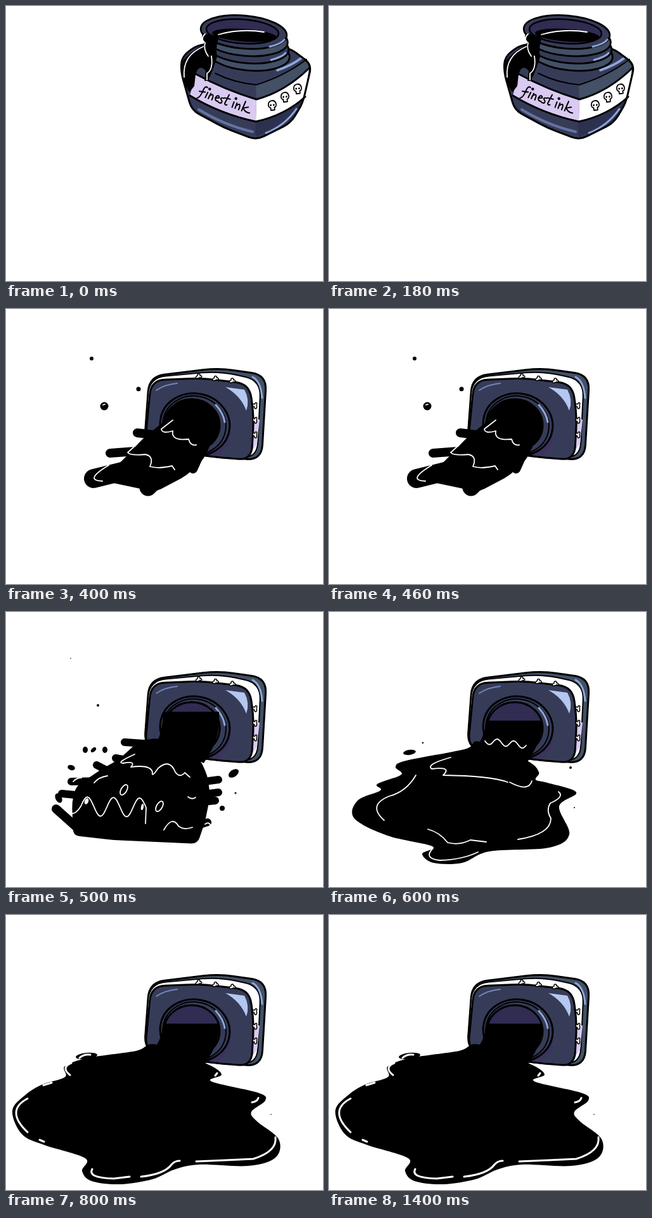
Write an HTML page that moves like this. It is 500 by 433 pixels and loops after 1.8 s.

```html
<!DOCTYPE html>
<html lang="en">
<head>
<meta charset="utf-8">
<title>Spilled ink</title>
<style>
html, body { margin: 0; width: 100%; height: 100%; overflow: hidden; background: #fff; }
svg { display: block; width: 100%; height: 100%; stroke-linecap: round; stroke-linejoin: round; }
.pose { visibility: hidden; animation: 1800ms step-end infinite; }
#full { animation-name: full; }
#tilt { animation-name: tilt; }
#fallen { animation-name: fallen; }
#gush { animation-name: gush; }
#splash { animation-name: splash; }
#pool { animation-name: pool; }
#spread { animation-name: spread; }
#rest { animation-name: rest; }
@keyframes full { 0% { visibility: visible } 16.666% { visibility: hidden } }
@keyframes tilt { 16.666% { visibility: visible } 22.222% { visibility: hidden } }
@keyframes fallen { 22.222% { visibility: visible } }
@keyframes gush { 22.222% { visibility: visible } 27.777% { visibility: hidden } }
@keyframes splash { 27.777% { visibility: visible } 33.333% { visibility: hidden } }
@keyframes pool { 33.333% { visibility: visible } 38.888% { visibility: hidden } }
@keyframes spread { 38.888% { visibility: visible } 44.444% { visibility: hidden } }
@keyframes rest { 44.444% { visibility: visible } }
</style>
</head>
<body>
<svg viewBox="0 0 500 433" preserveAspectRatio="none" role="img" aria-label="A bottle of finest ink tips over">
<defs>
  <g id="skull">
    <path d="M-3 4C-8 3-7-7 0-7S8 3 3 4V8H-3Z" fill="#fff" stroke="#000" stroke-width="1.8"/>
    <circle cx="-2.400" cy="0" r="1.400"/><circle cx="2.400" cy="0" r="1.400"/>
  </g>
  <path id="mark" d="M-4 3C-6 1-3-1-2-1C-3-5 3-5 2-1C5-2 6 2 3 2C1 1 0 4-4 3Z" fill="#fff" stroke="#000" stroke-width="1.5"/>
  <g id="lettering">
    <path fill="none" stroke="#000" stroke-width="2" d="M10-16Q5-18 5-8Q4 4 0 5M0-6L9-8M13-9L12 0M18-9L17 0M17-4Q22-12 23-5V0M27-5L33-7Q31-12 28-8Q26 0 33-1M40-9Q35-9 36-6Q41-3 38 0H34M46-17L44-2Q45 1 48-1M41-10L50-11M57-9V0M62-9V0M62-4Q67-12 68-5V0M74-16L73 0M81-9L74-5Q79 1 86-1"/>
    <circle cx="14" cy="-15" r="2.200"/><circle cx="58" cy="-15" r="2.200"/>
  </g>
</defs>
</svg>
<script>
const NAVY = '#363c58', DEEP = '#2c3150', STEEL = '#435066', GLEAM = '#8fa6da', LILAC = '#d9caf2', PLUM = '#302c52';

const pairs = text => text.match(/\S+ \S+/g).map(p => p.split(' ').map(Number));
const mix = (a, b, t) => a.map((v, k) => v + (b[k] - v) * t);

// Polygon with softened corners.
function soft(text, r) {
  const pts = pairs(text), n = pts.length;
  const cut = (a, b) => mix(a, b, Math.min(.5, r / Math.hypot(b[0] - a[0], b[1] - a[1])));
  return pts.map((p, i) =>
    `${i ? 'L' : 'M'}${cut(p, pts[(i + n - 1) % n])}Q${p} ${cut(p, pts[(i + 1) % n])}`).join('') + 'Z';
}

// Closed smooth curve through key points.
function blob(text) {
  const pts = pairs(text), n = pts.length, at = i => pts[(i + n) % n];
  const lean = (p, a, b) => p.map((v, k) => v + (b[k] - a[k]) / 6);
  return `M${pts[0]}` + pts.map((p, i) =>
    `C${lean(p, at(i - 1), at(i + 1))} ${lean(at(i + 1), at(i + 2), p)} ${at(i + 1)}`).join('') + 'Z';
}

// Sine ripple along a line.
function wave(x0, y0, x1, y1, amp, halves) {
  const steps = halves * 8;
  return 'M' + Array.from({ length: steps + 1 }, (_, i) => {
    const t = i / steps;
    return [x0 + (x1 - x0) * t, y0 + (y1 - y0) * t + amp * Math.sin(Math.PI * halves * t)].map(v => v.toFixed(1));
  }).join('L');
}

const shape = (d, fill = 'none', width = 0, stroke = '#000') =>
  `<path d="${d}" fill="${fill}" stroke="${stroke}" stroke-width="${width}"/>`;
const line = (d, width = 3, stroke) => shape(d, 'none', width, stroke);
const shine = (d, width = 1.8) => line(d, width, '#fff');
const oval = (x, y, rx, ry, turn = 0, fill = '#000', width = 0) =>
  `<ellipse rx="${rx}" ry="${ry}" transform="translate(${x} ${y}) rotate(${turn})" fill="${fill}" stroke="#000" stroke-width="${width}"/>`;
const row = (id, x, y, dx, dy, turn) => [0, 1, 2].map(i =>
  `<use href="#${id}" transform="translate(${x + dx * i} ${y + dy * i}) rotate(${turn})"/>`).join('');
const words = place => `<use href="#lettering" transform="${place}"/>`;
const scaled = (sx, sy, art) =>
  `<g transform="translate(240 204) scale(${sx} ${sy}) translate(-240 -204)">${art}</g>`;
const pose = (id, ...art) => `<g id="${id}" class="pose">${art.join('')}</g>`;

// Screw neck: equal rings stacked from the shoulder up to the rim.
const neck = (x, y, rx, ry, turn, dx, dy) => [3, 2, 1, 0].map(i =>
  oval(x + dx * i, y + dy * i, rx - i, ry, turn, i % 2 ? STEEL : NAVY, 2.8)).join('');

// Ink running out of the lying bottle, filled up to the given level.
const stem = level => shape(`M248 ${level}H336Q338 190 325 216L312 238L237 206Q247 190 248 ${level}Z`, '#000');

const upright = soft('302 61 277 80 276 104 293 164 345 192 395 211 449 184 468 153 482 92 447 66 380 58', 13);
const tipped = soft('272 88 250 114 252 138 276 172 288 194 310 205 394 213 433 162 439 128 412 49 378 48 320 68', 13);

const full = pose('full',
  shape(upright, NAVY),
  shape('M395 147L394 125Q440 110 474 84L478 98Q440 135 395 147Z', STEEL),
  shape('M393 183Q440 172 471 144L450 180L394 206Z', DEEP),
  line('M304 163Q345 188 389 198', 4, '#6473a3'),
  line('M410 200Q440 188 458 162', 3, GLEAM),
  line('M428 101Q450 94 467 81', 4, GLEAM),
  shape('M299 107Q345 132 395 147L394 182Q338 170 290 141Z', LILAC),
  shape('M395 147Q440 135 478 98L472 143Q440 172 394 182Z', '#fff'),
  line('M299 107Q345 132 395 147Q440 135 478 98M290 141Q338 170 394 182Q440 172 472 143'),
  line('M330 106Q360 121 395 124Q440 110 474 84', 2),
  line(upright),
  neck(375, 41, 68, 26, 5, 2.5, 11.5),
  line('M416 64Q434 60 439 53M418 85Q436 80 441 74', 3, GLEAM),
  oval(373, 40, 57, 19, 4, PLUM, 2.5),
  oval(376, 46, 51, 10, 4),
  shape('M312 43L336 48Q330 66 333 80Q326 104 318 118H313L315 102Q304 90 299 108L297 126L289 136Q270 104 280 85Q290 72 312 61Z', '#000'),
  shine('M281 112Q278 78 311 64M314 44Q306 52 314 58Q311 68 319 79M324 79Q327 100 317 106V116M335 45Q370 35 407 41'),
  words('translate(303 140) rotate(20)'),
  row('skull', 420, 156, 20, -13, -6));

const tilt = pose('tilt',
  shape(tipped, NAVY),
  shape('M367 140L362 123Q390 98 401 52L413 62Q398 105 367 140Z', STEEL),
  line('M396 201Q424 180 432 145', 3, GLEAM),
  line('M370 119Q394 98 399 66', 3, GLEAM),
  shape('M274 143Q320 149 367 140L386 181Q330 184 279 176Z', LILAC),
  shape('M367 140Q400 100 413 62L432 104Q416 170 386 181Z', '#fff'),
  line('M274 143Q320 149 367 140Q400 100 413 62M279 176Q330 184 386 181Q416 170 432 104'),
  line('M296 127Q335 132 362 123Q390 98 401 52', 2),
  line(tipped),
  neck(320, 53, 50, 25, -18, 4.5, 11.5),
  line('M349 78Q365 71 370 62M353 98Q370 90 376 80', 3, GLEAM),
  oval(318, 52, 41, 18, -18, '#39375e', 2.5),
  shape('M278 72Q310 48 350 42Q342 64 302 76Z', '#000'),
  shape('M272 76L290 80L291 100Q302 135 294 145Q288 142 289 120Q280 108 277 125V167Q256 152 254 125Q258 112 270 104Z', '#000'),
  line('M249 68Q275 74 300 70', 14), line('M268 44L298 66', 12),
  oval(243.5, 39, 6, 5, 25),
  shine('M254 134Q252 118 265 105M272 85Q275 96 271 103M287 82Q290 94 282 98Q296 116 292 141M247 69Q254 73 261 73M268 43L273 46M312 66Q335 60 343 49'),
  words('translate(288 168) rotate(4) scale(.97)'),
  row('skull', 397, 143, 10, -20.5, -38));

const fallen = pose('fallen',
  shape(soft('226 106 335 93 411 104 403 238 318 232 218 214', 24), STEEL, 3),
  shape(soft('226 108 335 98 402 112 396 236 218 214', 26), '#fff', 2),
  shape('M386 174H400L396 212L382 232Z', LILAC),
  line('M389 107Q402 114 404 140', 3, GLEAM),
  shape(soft('229 112 310 109 384 118 391 170 387 238 318 232 219 214', 22), NAVY, 3),
  shape('M316 230Q350 215 352 190L353 212L338 230Z', '#3c335f'),
  shape('M346 123L376 127Q385 143 379 160Q370 136 346 123Z', '#b4c7ef'),
  line('M237 128Q250 119 270 117', 2, '#7186ba'),
  oval(298, 182, 55, 49, 10, NAVY, 3),
  oval(297, 183, 50, 46, 10, NAVY, 2),
  line('M331 151Q343 164 345 178', 3, GLEAM),
  oval(293, 183, 44, 41, 0, PLUM, 3),
  row('mark', 304, 106, 26.5, 3.5, 0),
  row('mark', 393, 152, 0, 23, -75));

const gush = pose('gush',
  oval(293, 183, 44, 41),
  shape(soft('250 176 336 185 312 236 285 262 236 288 150 270 190 232 215 205', 10), '#000'),
  line('M207 195L250 200M164 227L230 222M295 252L305 230', 14),
  line('M138 267L215 248', 30), line('M224 281L255 250', 27),
  oval(135, 78, 3, 3), oval(209, 126, 3.5, 3.5), oval(155, 153, 6.5, 6.5),
  shine('M263 175L245 189Q246 197 263 192Q260 208 288 205Q291 216 300 214M204 215L192 226Q196 231 220 229Q234 232 227 248Q240 252 262 247L266 253M162 246Q122 270 152 271M153 151L156 150'));

const splash = pose('splash',
  oval(293, 183, 44, 41, 0, PLUM, 3),
  stem(157),
  shape(soft('240 198 210 203 178 232 150 248 110 275 104 300 106 352 170 359 302 365 314 330 322 290 318 258 306 232', 10), '#000'),
  line('M187 205L230 208M173 230L200 235M143 241L180 260M103 267L150 266M88 286L130 290M335 264L290 270M335 284L290 290M330 297L300 300M318 331L290 340', 12),
  line('M79 310L116 343', 14),
  oval(125, 217, 4, 5), oval(138, 217, 5, 3, -40), oval(156, 217, 4, 5), oval(103, 245, 6, 4, 20),
  oval(83, 293, 5, 8, -25), oval(359, 254, 9, 5.5, -35), oval(341, 309, 4, 4), oval(145, 147, 2, 2),
  oval(362, 285, 1.5, 1.5), oval(102, 73, .8, .8),
  shine('M203 224Q172 238 185 238Q206 234 197 244Q228 240 231 252Q229 262 240 246Q258 230 267 252Q274 262 282 253L290 260'),
  shine(wave(118, 306, 221, 308, -15, 5) + 'L220 333M92 308Q104 328 118 306'),
  shine('M249 343Q262 320 272 337Q281 344 294 339M106 267Q111 261 119 261M139 269Q146 260 160 258M287 291Q293 296 299 292M314 334Q320 330 322 335'),
  [[186, 280], [242, 306]].map(([x, y]) =>
    `<g stroke="#fff" transform="translate(${x} ${y}) rotate(30)"><ellipse rx="4.500" ry="9" fill="none" stroke-width="1.800"/></g>`).join(''),
  oval(127, 298, 3, 5, 20, '#fff'), oval(215, 307, 2, 5, 10, '#fff'));

const pool = pose('pool', stem(171),
  shape(blob('238 204 214 216 122 234 105 244 114 256 76 271 81 281 45 297 40 325 92 352 163 369 147 381 165 395 210 395 253 377 347 371 379 350 363 306 390 284 345 269 326 264 331 252 312 234'), '#000'),
  oval(127, 221, 10, 4, -8), oval(148, 206, 1.2, 1.2), oval(381, 245, 2, 2), oval(387, 308, 1, 1),
  shine(wave(246, 203, 311, 210, 5, 5)),
  shine('M192 229Q152 240 162 247Q195 243 180 257Q255 258 282 268M285 268Q315 284 320 266M137 257Q122 283 95 290Q60 304 87 328M362 283Q372 291 349 301Q342 312 350 325Q350 350 298 358M156 342Q175 347 187 363Q205 368 223 359L248 362M164 372Q148 388 175 391Q210 390 235 378'));

// The last two poses share one puddle, smaller and then at full size.
const puddle = shape(blob('237 204 205 214 130 225 93 238 93 255 57 267 31 283 10 308 25 345 60 362 125 383 120 403 135 419 180 424 231 416 265 401 304 393 382 395 425 382 430 353 396 325 387 310 409 292 398 280 324 262 340 251 316 234'), '#000');
const rim = 'M34 289Q-2 308 34 342M53 354L60 357M103 233Q86 240 101 252M136 400Q128 414 170 415L195 412M213 412Q250 408 261 393Q266 387 274 387M300 388Q350 386 390 384Q428 372 425 350M388 295Q396 294 398 288';

const spread = pose('spread', stem(171), scaled(.9, .945, puddle),
  oval(127, 221, 14, 5, -6), oval(403, 315, 1, 1),
  scaled(.84, .94, shine(rim, 1.3)),
  shine('M229 211L220 222' + wave(220, 225, 304, 236, 4, 5).replace('M', 'L')));

const rest = pose('rest', stem(171), puddle,
  oval(127, 222, 17, 5, -6), oval(418, 314, .8, .8),
  shine(rim + 'M116 225Q122 219 133 220M59 268L72 264M330 253L333 249', 3));

document.querySelector('svg').insertAdjacentHTML('beforeend',
  [full, tilt, fallen, gush, splash, pool, spread, rest].join(''));
</script>
</body>
</html>
```
